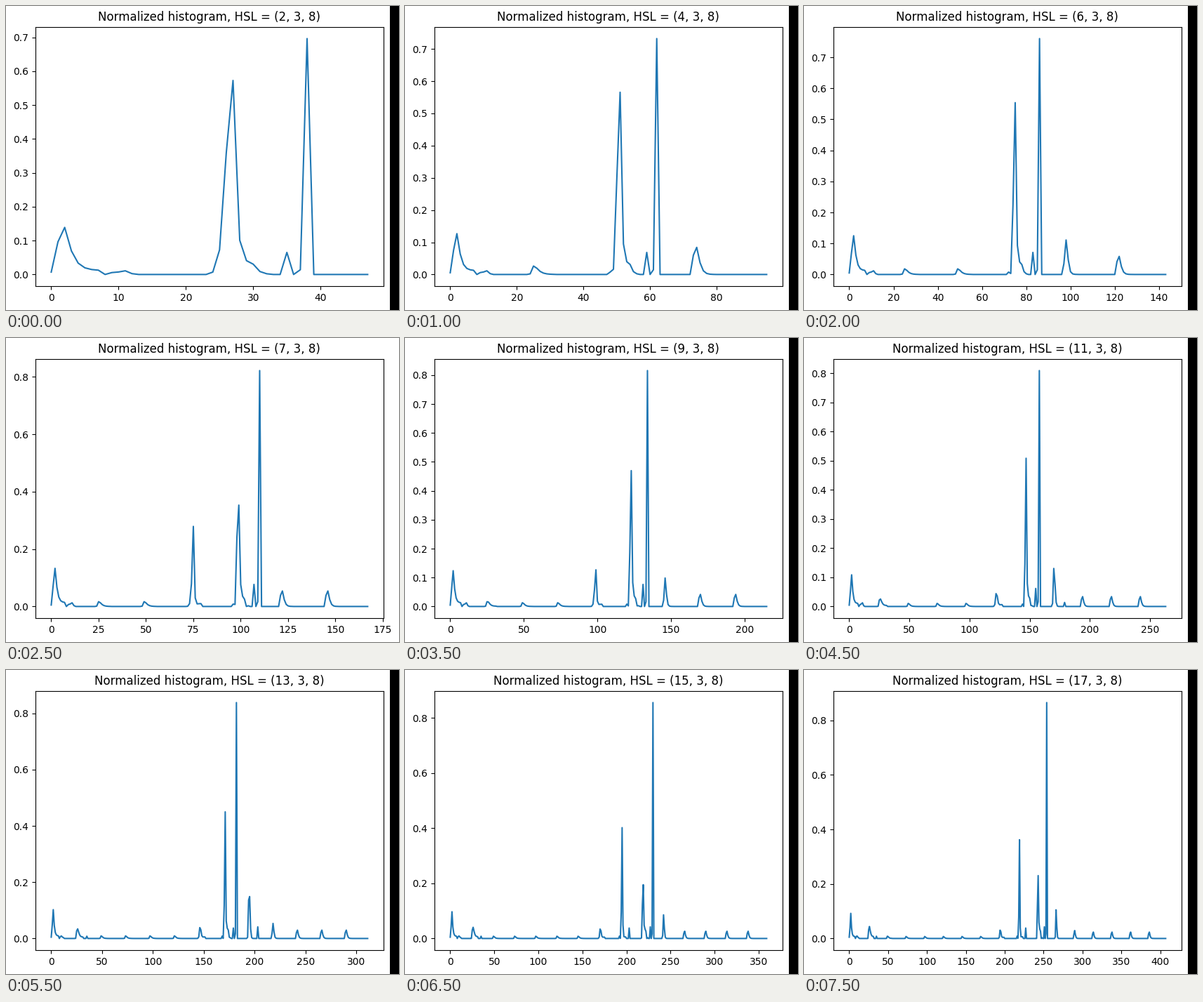
Animation of 560x433 px, one loop 8 s. Source, as a matplotlib script:

```python
import numpy as np
import matplotlib.pyplot as plt
from matplotlib.animation import FuncAnimation
from matplotlib.patches import Rectangle

W, H = 560, 433
LEFT, BOTTOM, AX_W, AX_H = 41.9, 33.8, 496, 369.6
S_BINS, L_BINS = 3, 8
BLOCK = S_BINS * L_BINS
HUES = range(2, 18)

# Grayish tones: hue from, hue to, log-lightness centre, spread, mass.
LOBES = [
    (0, .04, .85, .1, .058),         # deep red
    (0, .12, .8, .46, .106),         # red to brown
    (0, .12, 2.1, .2, .0135),        # pale skin
    (.12, .5, .5, .55, .055),        # dark greens
    (.5, .546, 1.05, .12, .058),     # cyan
    (.5, .572, 2.0, .25, .012),      # pale cyan
    (.546, .576, 1.19, .035, .385),  # azure
    (.576, .645, 1.17, .077, .35),   # blue
    (.645, .71, .95, .1, .135),      # indigo
    (.71, 1, .75, .27, .147),        # violet
]

# Single colours: channel within a hue block, hue, mass.
COLOURS = [
    (0, .03, .005), (0, .58, .01), (5, .605, .034), (6, .605, .03),
    (8, .605, .003), (9, .03, .008), (10, .03, .0105), (11, .03, .006),
    (11, .09, .0095), (11, .58, .044), (11, .625, .032), (11, .642, .017),
    (12, .03, .0035), (13, .605, .02), (14, .605, .995),
]


def histogram(hues):
    """Flattened H x S x L histogram with unit L2 norm."""
    bins = np.zeros((hues, BLOCK))
    edges = np.arange(hues + 1) / hues
    light = np.log(np.arange(L_BINS) + .5)
    for lo, hi, centre, spread, mass in LOBES:
        share = np.diff(np.clip((edges - lo) / (hi - lo), 0, 1))
        profile = mass * np.exp(-(light - centre) ** 2 / spread)
        bins[:, :L_BINS] += np.outer(share, profile)
    for channel, hue, mass in COLOURS:
        bins[int(hue * hues), channel] += mass
    return bins.ravel() / np.linalg.norm(bins)


def page_width():
    """Width of the tightly cropped plot, including an overhanging label."""
    lo, hi = ax.get_xlim()
    last = max(t for t in ax.get_xticks() if t <= hi)
    label_end = LEFT + AX_W * (last - lo) / (hi - lo) + 23.25
    return min(W, int(max(LEFT + AX_W + 10, label_end)))


fig = plt.figure(figsize=(W / 100, H / 100), dpi=100, facecolor="white")
ax = fig.add_axes([LEFT / W, BOTTOM / H, AX_W / W, AX_H / H])
strip = Rectangle((1, 0), 0, 1, transform=fig.transFigure, facecolor="black",
                  linewidth=0, antialiased=False)
fig.add_artist(strip)


def update(i):
    hues = HUES[i]
    ax.clear()
    ax.plot(histogram(hues), color="C0", lw=1.5)
    ax.set_title(f"Normalized histogram, HSL = ({hues}, {S_BINS}, {L_BINS})")
    x = page_width()
    strip.set_x(x / W)
    strip.set_width((W - x) / W)
    strip.set_visible(x < W)
    return ()


anim = FuncAnimation(fig, update, frames=len(HUES), interval=500,
                     init_func=lambda: (), repeat=True, repeat_delay=0)
plt.show()
```
